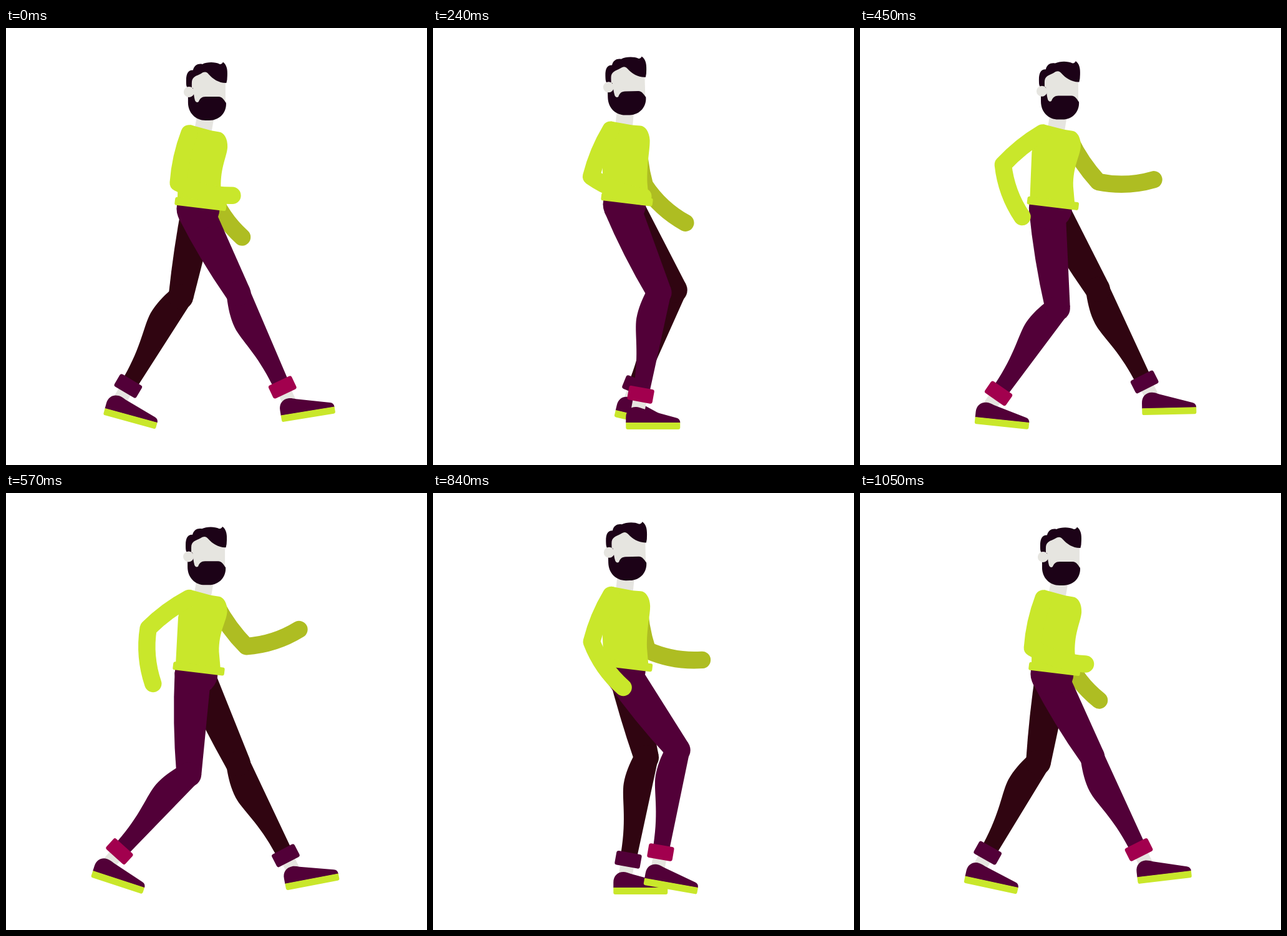
Write an HTML page with a canvas that moves like this. It is 675x700 px and loops after 1.08 s.

```html
<!DOCTYPE html>
<html lang="en">
<head>
<meta charset="utf-8">
<title>Walk cycle</title>
<style>
  html, body { margin: 0; width: 100%; height: 100%; overflow: hidden; background: #fff; }
  canvas { display: block; width: 675px; height: 700px; }
</style>
</head>
<body>
<canvas id="stage"></canvas>
<script>
const W = 675, H = 700, LOOP = 1080, STEP = 30, RAD = Math.PI / 180, TAU = 2 * Math.PI;
const GROUND = 632, SHOE_LENGTH = 87, SHIN_LENGTH = 197;
const COLOR = {
  lime: '#c9e72b', limeDark: '#aebd22', plum: '#520038', plumDark: '#300511',
  berry: '#a2004e', hair: '#1c0217', skin: '#e6e5e0'
};

// A smooth periodic motion: mean plus [cosine, sine] weights of each harmonic.
const wave = (mean, ...harmonics) => t => harmonics.reduce((sum, [c, s], i) => {
  const a = TAU * (i + 1) * t / LOOP;
  return sum + c * Math.cos(a) + s * Math.sin(a);
}, mean);

// Half a cosine around a peak time, zero beyond its reach.
function bump(t, peak, reach) {
  const d = Math.abs(t - peak), gap = Math.min(d, LOOP - d);
  return gap < reach ? Math.cos(Math.PI / 2 * gap / reach) : 0;
}

// Arm and shin angles are in degrees from straight down.
const footX = wave(296.3, [146, -5.8], [-4.1, -19.3], [2.5, 3.1]);
const nearShin = wave(11.8, [-32.7, -0.4], [-3.8, 5.1], [-0.5, 1.2]);
const farShin = wave(5.3, [-31.8, -3.8], [-4.5, 3.7], [2, 1.1]);
const nearUpper = wave(-30.2, [22.4, 0], [-3, 0], [-1.8, 0]);
const nearFore = wave(43.9, [35, 17], [-2.1, 1.1]);
const farUpper = wave(13.9, [-23, -1.2], [0.9, -0.5], [1.5, 0]);
const farFore = wave(69.8, [-35.6, -16.6]);

// The heel peels off, the toe lifts for the next contact, then both land flat.
const heelLift = t => 32 * bump(t, 650, 310) ** 2 + 23 * bump(t, 980, 200) ** 2;
const toeLift = t => 27 * bump(t, 1040, 190);

const canvas = document.getElementById('stage');
const ctx = canvas.getContext('2d');
const dpr = window.devicePixelRatio || 1;
canvas.width = W * dpr;
canvas.height = H * dpr;

const SHIN = new Path2D('M-19.5 -2 C-25 15 -28.5 30 -28.5 47 C-28 70 -14 100 -13.3 156 V166 H13.3 V156 L18.8 4 Z');
const SHOE = new Path2D('M0 0.5 V-8 C0 -19 7 -25 16 -25 C20 -25 24 -23.5 28 -22 L81 -7.5 Q87 -6 87 0.5 Z');
const FACE = new Path2D('M297 102 V82 L303 74 L320 68 L345 80 L352 86 V122 H300 Z');
const HAIR = new Path2D('M292 104 V96 C289 95 289 90 289 84 C289 72 293 67 300 67.5 C302 59 309 56.5 315 58 ' +
  'C322 54.5 335 54 343 58 C346 58 347.5 56 348 54.5 C354 59 355.5 66 355 76 Q355 83 353.5 88 ' +
  'C342 88.5 332 82 325 74 C321 69.5 318 70 313 73 C305 77 298 78 298 88 V104 Z');
const BEARD = new Path2D('M292 96 H300 C301 104 301.5 110 303 115.5 C304 119 307 120 309 118 ' +
  'C311 113 314 110 320 110 H341 C347 110 350 116 353 120 C354 134 344 148 326 148 H320 C304 148 292 136 292 119 Z');

function fill(color, path) {
  ctx.fillStyle = color;
  path ? ctx.fill(path) : ctx.fill();
}

function disc(x, y, r, color) {
  ctx.beginPath();
  ctx.arc(x, y, r, 0, TAU);
  fill(color);
}

function box(x, y, w, h, r, color) {
  ctx.beginPath();
  ctx.roundRect(x, y, w, h, r);
  fill(color);
}

function placed(x, y, angle, paint) {
  ctx.save();
  ctx.translate(x, y);
  ctx.rotate(angle);
  paint();
  ctx.restore();
}

// The foot leads: the ankle sits on the shoe and the shin angle places the knee.
function drawLeg(t, shift, shin, hip, color, cuff) {
  const heel = heelLift(t), tilt = Math.asin((heel - toeLift(t)) / SHOE_LENGTH);
  const sx = footX(t) + shift, sy = GROUND - heel, a = shin * RAD;
  const cos = Math.cos(tilt), sin = Math.sin(tilt);
  const kx = sx + 18.3 * cos + 14.2 * sin + SHIN_LENGTH * Math.sin(a);
  const ky = sy + 18.3 * sin - 14.2 * cos - SHIN_LENGTH * Math.cos(a);
  const { x, y, back, front } = hip;
  const len = Math.hypot(kx - x, ky - y);
  const nx = (ky - y) / len, ny = (x - kx) / len, knee = 20;

  placed(kx, ky, a, () => {
    ctx.fillStyle = COLOR.skin;
    ctx.fillRect(-11, 162, 22, 29);
    fill(color, SHIN);
  });

  ctx.beginPath();
  ctx.moveTo(x + nx * front, y + ny * front);
  ctx.lineTo(kx + nx * knee, ky + ny * knee);
  ctx.lineTo(kx - nx * knee, ky - ny * knee);
  ctx.quadraticCurveTo((x + kx) / 2 - nx * (back - 2), (y + ky) / 2 - ny * (back - 2),
    x - nx * back, y - ny * back);
  fill(color);
  disc(x, y, back, color);
  disc(kx, ky, knee, color);

  placed(kx, ky, a, () => box(-20.5, 154.5, 41, 23, 3.5, cuff));
  placed(sx, sy, tilt, () => {
    fill(COLOR.plum, SHOE);
    box(0, 0, SHOE_LENGTH, 11, [0, 0, 3, 3], COLOR.lime);
  });
}

function drawArm(shoulder, upper, fore, color) {
  let [x, y] = shoulder;
  const bone = (deg, length, bow) => {
    const dx = Math.sin(deg * RAD), dy = Math.cos(deg * RAD);
    const mx = x + dx * length / 2 - dy * bow, my = y + dy * length / 2 + dx * bow;
    x += dx * length;
    y += dy * length;
    ctx.quadraticCurveTo(mx, my, x, y);
  };
  ctx.beginPath();
  ctx.moveTo(x, y);
  bone(upper, 81, 6);
  bone(fore, 89, 11);
  ctx.lineWidth = 27.5;
  ctx.lineCap = ctx.lineJoin = 'round';
  ctx.strokeStyle = color;
  ctx.stroke();
}

function drawTorso(chest, hemX, hemY) {
  const low = (x, y) => [x + hemX - 312, y + hemY - 282];
  ctx.beginPath();
  ctx.moveTo(...low(275, 276));
  ctx.lineTo(...chest(276.5, 200));
  ctx.lineTo(...chest(283, 164));
  ctx.lineTo(...chest(296, 155.3));
  ctx.lineTo(...chest(329, 164.3));
  ctx.lineTo(...chest(342, 166.5));
  ctx.bezierCurveTo(...chest(350, 167.5), ...chest(355.8, 178), ...chest(355.2, 191));
  ctx.bezierCurveTo(...chest(354, 207), ...low(344, 222), ...low(344.5, 255));
  ctx.lineTo(...low(347, 284));
  fill(COLOR.lime);
  placed(hemX, hemY, 6.9 * RAD, () => box(-41.5, -6.5, 83, 13, 3, COLOR.lime));
}

function draw(t) {
  // Twice per loop the body rises and straightens, from 0 (low) to 1 (high).
  const rise = (1 - Math.cos(2 * TAU * (t + 18) / LOOP)) / 2;
  const lean = -5 * rise * RAD, cos = Math.cos(lean), sin = Math.sin(lean);
  const chest = (x, y) => [
    325 - 9.8 * rise + (x - 325) * cos - (y - 165) * sin,
    165 - 8.5 * rise + (x - 325) * sin + (y - 165) * cos
  ];
  const hemX = 310.5 + 1.5 * Math.cos(TAU * (t - 30) / LOOP);
  const hemY = 282 - 7.5 * rise;

  ctx.setTransform(dpr, 0, 0, dpr, 0, 0);
  ctx.fillStyle = '#fff';
  ctx.fillRect(0, 0, W, H);

  drawArm(chest(338, 181), farUpper(t), farFore(t), COLOR.limeDark);
  const half = (t + LOOP / 2) % LOOP;
  drawLeg(half, 15, farShin(half),
    { x: hemX - 0.5, y: hemY + 6.5, back: 30, front: 25 }, COLOR.plumDark, COLOR.plum);
  drawLeg(t, 0, nearShin(t),
    { x: hemX - 4, y: hemY + 7.7, back: 34.5, front: 24 }, COLOR.plum, COLOR.berry);

  ctx.beginPath();
  ctx.moveTo(...chest(308, 132));
  ctx.lineTo(...chest(335, 136));
  ctx.lineTo(...chest(329, 170));
  ctx.lineTo(...chest(302, 164));
  fill(COLOR.skin);
  drawTorso(chest, hemX, hemY);
  drawArm(chest(294, 169), nearUpper(t), nearFore(t), COLOR.lime);

  placed(322 - 11.8 * rise, 118 - 8.5 * rise, -1.5 * rise * RAD, () => {
    ctx.translate(-322, -118);
    fill(COLOR.skin, FACE);
    fill(COLOR.hair, HAIR);
    fill(COLOR.hair, BEARD);
    disc(293.5, 102.5, 8.5, COLOR.skin);
  });
}

function tick(now) {
  draw(Math.floor(now / STEP) * STEP % LOOP);
  requestAnimationFrame(tick);
}
draw(0);
requestAnimationFrame(tick);
</script>
</body>
</html>
```
